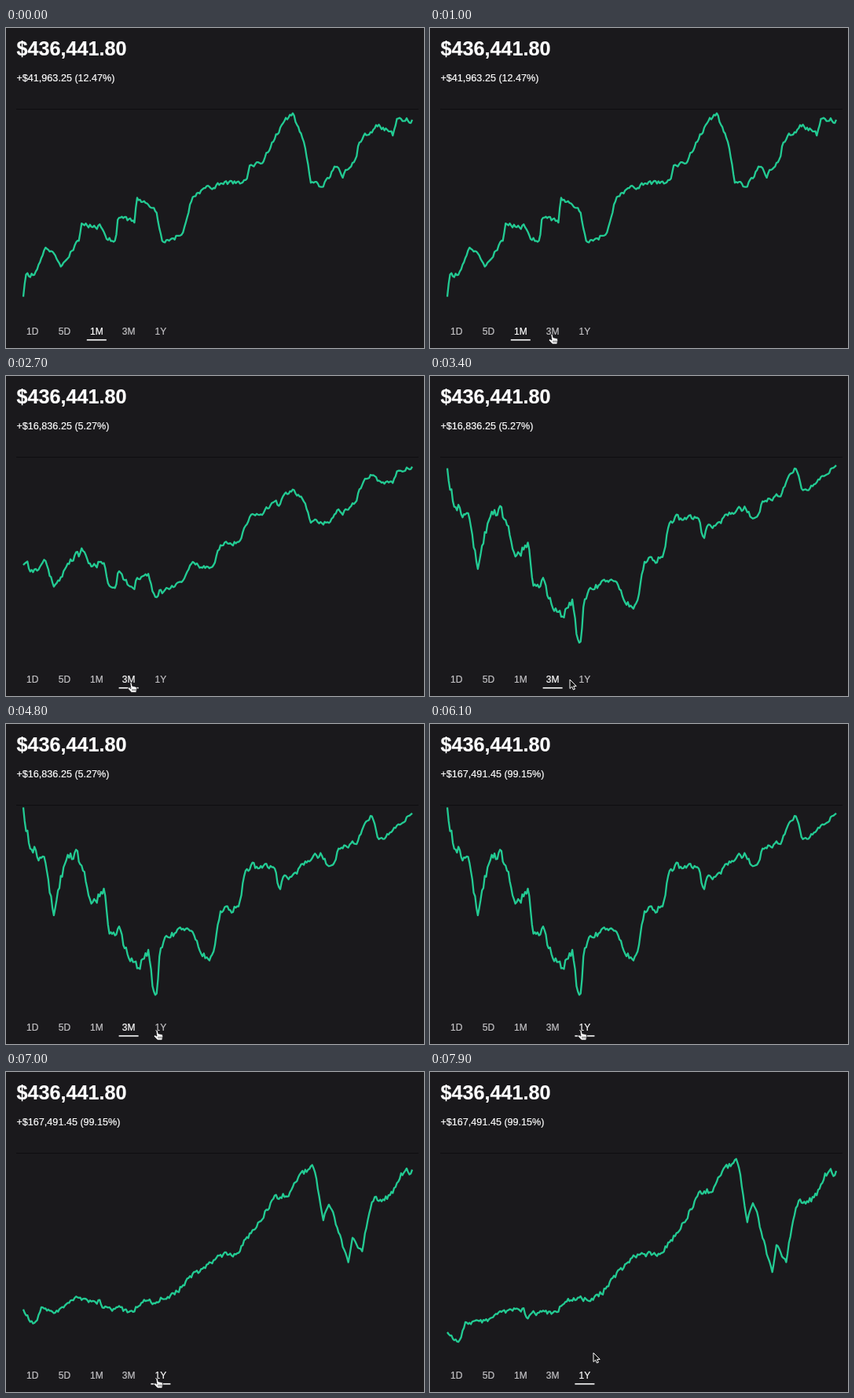
An HTML page that plays this animation: 532x408 px, repeating every 8000 ms.

```html
<!DOCTYPE html>
<html lang="en">
<head>
<meta charset="utf-8">
<title>Portfolio chart</title>
<style>
  html, body { margin: 0; width: 100%; height: 100%; overflow: hidden; background: #1a191c; }
  svg { display: block; width: 532px; height: 408px; font-family: "Liberation Sans", Arial, sans-serif; }
  text { fill: #fff; stroke: #fff; stroke-width: .2px; }
  #tabs text { font-size: 12px; text-anchor: middle; fill: #c4c3c6; stroke: #c4c3c6; }
  #tabs text.on { fill: #fff; stroke: #fff; }
</style>
</head>
<body>
<svg viewBox="0 0 532 408">
  <text x="13.5" y="34.5" font-size="25.2" font-weight="bold">$436,441.80</text>
  <text id="gain" x="13.5" y="68" font-size="12.6"></text>
  <path d="M13 103.5H525" stroke="#0e0d10"/>
  <path id="line" fill="none" stroke="#23cb93" stroke-width="2.3" stroke-linejoin="round"/>
  <g id="tabs"></g>
  <path id="bar" d="M-12.5 397.7h25" stroke="#fff" stroke-width="1.6"/>
  <g id="cursor">
    <path id="arrow" d="M0 0V11.5L2.7 9.1 4.4 13 6.4 12.2 4.7 8.4H8.2Z" fill="#111" stroke="#fff"/>
    <g id="hand" stroke="#161518" stroke-width=".8">
      <path d="M-1.2 .8Q0-.6 1 .8L1.9 4.8 6 5.6Q8 6.2 7.7 8.5L6.7 13H.8L-3.7 8.3Q-4 6.6-2.3 6.7L0 8Z" fill="#fff"/>
      <path d="M2 8.5v2.4M4 8.5v2.4M6 8.5v2.4" fill="none"/>
    </g>
  </g>
</svg>
<script>
const $ = id => document.getElementById(id);
const LOOP = 8000, STEP = 100, MORPH = 1500;
const LEFT = 22, RIGHT = 517, PARTS = 280;

// trend: turning points x,y; rough: size of the jitter at the left and right end
const ranges = [
  {
    tab: 2, from: 0, start: -MORPH, gain: '+$41,963.25 (12.47%)', rough: [6, 6],
    trend: `22,345 25,317 36,313 51,277 70,303 93,272 96,249 120,253 126,268 140,273 142,245
      164,245 166,216 192,236 198,271 225,264 237,215 268,200 306,196 309,177 326,169 356,116
      365,112 379,146 388,197 402,204 421,174 428,189 446,168 449,146 474,123 493,136 497,117 517,118`
  },
  {
    tab: 3, from: 2300, start: 2310, gain: '+$16,836.25 (5.27%)', rough: [15, 5],
    trend: `22,111 30,150 53,186 61,246 70,196 77,173 91,168 109,222 126,215 132,266 145,266
      149,284 168,308 181,292 188,346 192,338 196,288 206,267 235,262 248,292 262,298 273,240
      297,232 305,182 341,180 348,214 353,198 400,166 414,185 424,158 446,150 466,116 475,150 509,120 517,117`
  },
  {
    tab: 4, from: 6100, start: 6130, gain: '+$167,491.45 (99.15%)', rough: [5, 10],
    trend: `22,333 37,345 45,321 72,317 108,300 120,303 124,319 128,308 155,308 175,291 212,289
      240,256 266,232 292,234 322,194 341,158 364,148 371,130 391,112 404,190 411,162
      436,262 441,226 454,241 466,167 488,161 503,134 517,129`
  }
];

// time, x, y of the pointer tip
const moves = [
  [300, 141, 406], [1000, 155, 390], [2300, 155, 390], [3000, 162, 391], [3400, 178, 387],
  [4000, 189, 390], [4800, 192, 390], [7000, 192, 390], [7900, 208, 358]
];

const mix = (a, b, k) => a + (b - a) * k;

// Value at p on a line through points [p, ...values]
function along(points, p) {
  const n = points.findIndex(q => q[0] > p);
  if (n < 0) return points[points.length - 1];
  const a = points[Math.max(0, n - 1)], b = points[n];
  const k = a === b ? 0 : (p - a[0]) / (b[0] - a[0]);
  return a.map((v, i) => mix(v, b[i], k));
}

function seeded(seed) {
  return () => (seed = seed * 16807 % 2147483647) / 2147483647;
}

function heights({ tab, trend, rough }) {
  const random = seeded(tab * 7919);
  const points = trend.trim().split(/\s+/).map(p => p.split(',').map(Number));
  let jitter = 0;
  return Array.from({ length: PARTS + 1 }, (_, i) => {
    const k = i / PARTS;
    jitter = jitter * .5 + random() - .5;
    return along(points, mix(LEFT, RIGHT, k))[1] + jitter * mix(...rough, k);
  });
}
ranges.forEach(r => r.points = heights(r));

// cubic-bezier(.25, .1, .25, 1)
function ease(p) {
  if (p <= 0) return 0;
  if (p >= 1) return 1;
  let lo = 0, hi = 1, s;
  for (let i = 0; i < 24; i++) {
    s = (lo + hi) / 2;
    if (.75 * s * (1 - s) + s ** 3 < p) lo = s; else hi = s;
  }
  return .3 * s * (1 - s) ** 2 + 3 * (1 - s) * s * s + s ** 3;
}

const tabX = i => 33.7 + i * 40.8;
const tabs = ['1D', '5D', '1M', '3M', '1Y'].map((name, i) => {
  const label = document.createElementNS('http://www.w3.org/2000/svg', 'text');
  label.textContent = name;
  label.setAttribute('x', tabX(i));
  label.setAttribute('y', 391);
  return $('tabs').appendChild(label);
});

const show = (id, on) => $(id).style.display = on ? '' : 'none';

function drawCursor(t) {
  const [, x, y] = along(moves, t);
  const over = y > 374 && y < 404 && tabs.some((_, i) => Math.abs(x - tabX(i)) < 14);
  $('cursor').setAttribute('transform', `translate(${x} ${y})`);
  show('cursor', t >= moves[0][0]);
  show('hand', over);
  show('arrow', !over);
}

function draw(t) {
  const n = ranges.filter(r => r.from <= t).length - 1;
  const now = ranges[n], old = ranges[Math.max(0, n - 1)];
  const k = ease((t - now.start) / MORPH);
  $('line').setAttribute('d', 'M' + now.points.map((y, i) =>
    `${mix(LEFT, RIGHT, i / PARTS).toFixed(2)} ${mix(old.points[i], y, k).toFixed(2)}`).join('L'));
  $('gain').textContent = now.gain;
  $('bar').setAttribute('transform', `translate(${tabX(now.tab)} 0)`);
  tabs.forEach((label, i) => label.classList.toggle('on', i === now.tab));
  drawCursor(t);
}

const begin = performance.now();
function tick() {
  const t = (performance.now() - begin) % LOOP;
  draw(Math.floor(t / STEP) * STEP);
  requestAnimationFrame(tick);
}
tick();
</script>
</body>
</html>
```
